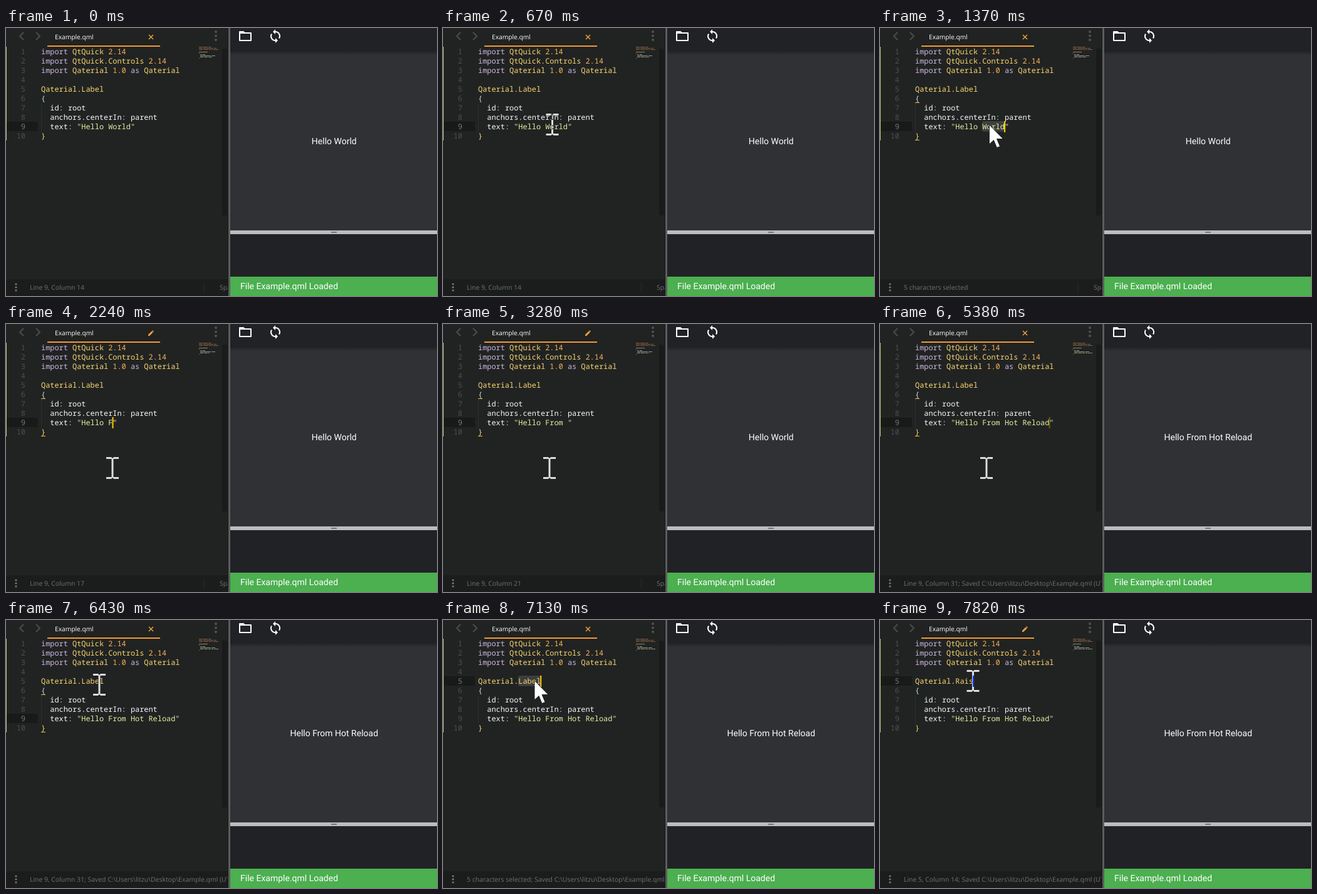
These frames come from a looping animation (688 by 429 pixels, 7.99 s). An HTML page:

```html
<!DOCTYPE html>
<html lang="en">
<head>
<meta charset="utf-8">
<title>Hot reload</title>
<style>
  html, body { margin: 0; width: 100%; height: 100%; overflow: hidden; background: #202322; }
  svg { display: block; width: 688px; height: 429px; }
  text { white-space: pre; text-rendering: geometricPrecision; }
  .code { font: 11.92px "Noto Sans Mono", monospace; }
  .ui { font: 10.45px "Open Sans", sans-serif; fill: #6f7271; }
  .tab { font-size: 10.2px; fill: #fff; }
  .app { font: 14px Roboto, sans-serif; fill: #fff; }
  .beam { mix-blend-mode: difference; fill: #fff; }
</style>
</head>
<body>
<svg viewBox="0 0 688 429">
  <defs>
    <clipPath id="pane"><path d="M0 0H355V429H0z"/></clipPath>
    <linearGradient id="shade" x2="0" y2="1">
      <stop stop-color="#25262a"/><stop offset="1" stop-color="#303135"/>
    </linearGradient>
  </defs>

  <!-- editor -->
  <path fill="#202322" d="M0 0H358V429H0z"/>
  <path fill="#191b1b" d="M345 33h8v267h-8z"/>
  <path fill="#1b1d1d" d="M0 402H355V429H0z"/>
  <path fill="#b9cf78" d="M0 30h1v150H0z"/>
  <path fill="#f79a32" d="M66 28h180v2H66z"/>
  <path fill="none" stroke="#4a4d4c" stroke-width="2" d="M28 7l-6 6 6 6M48 7l6 6-6 6"/>
  <g fill="#505352"><circle cx="335" cy="6" r="2"/><circle cx="335" cy="12.500" r="2"/><circle cx="335" cy="19" r="2"/></g>
  <g fill="#777a79"><circle cx="16" cy="410" r="1.600"/><circle cx="16" cy="415" r="1.600"/><circle cx="16" cy="420" r="1.600"/></g>
  <text class="ui tab" x="78" y="18">Example.qml</text>
  <path stroke="#383c3b" stroke-dasharray="1 1" d="M56.500 121v45"/>
  <g id="editor" clip-path="url(#pane)"></g>

  <!-- preview -->
  <path fill="#303135" d="M358 38H688V324H358z"/>
  <path fill="#212226" d="M358 0H688V38H358zM358 330H688V398H358z"/>
  <path fill="url(#shade)" d="M358 38H688v6H358z"/>
  <path fill="#bdbdbd" d="M358 324H688v6H358z"/>
  <path fill="#77787a" d="M519 326h9v2h-9z"/>
  <path fill="#4caf50" d="M358 398H688V429H358z"/>
  <path fill="#191b1b" d="M354 0h1V429h-1z"/>
  <path fill="#5c5d5d" d="M355 0h3V429h-3z"/>
  <path fill="none" stroke="#fff" stroke-width="2" stroke-linejoin="round" d="M373 8V6h6l2 2h10v12H373zV8h9"/>
  <g transform="translate(418 1)" fill="#fff">
    <path fill="none" stroke="#fff" stroke-width="2" d="M12 5a7 7 0 0 1 6 10.600M12 19a7 7 0 0 1-6-10.600"/>
    <path d="M12 1L8 5l4 4zM12 15l4 4-4 4z"/>
  </g>
  <text id="label" class="app" x="523.800" y="185.500" text-anchor="middle"></text>
  <text class="app" x="374" y="418">File Example.qml Loaded</text>
  <g id="mouse"></g>
</svg>

<script>
const LOOP = 7990, LEFT = 56, CHAR = 7.15, ROW = 15;
const KEYWORD = '#cdb6e0', TYPE = '#fbd470', NUMBER = '#f9b25c', PLAIN = '#f7f8f7',
      COLON = '#bfdce2', STRING = '#e4eda0', CARET = '#ffcc00', ORANGE = '#f9a43a';
const byId = id => document.getElementById(id);
const columnX = column => LEFT + (column - 1) * CHAR;
const rowTop = line => 15 + ROW * line;
const rect = (x, y, w, h, fill, more = '') =>
  `<rect x="${x}" y="${y}" width="${w}" height="${h}" fill="${fill}" ${more}/>`;

// Each step overrides part of the state and holds until the next one.
const steps = [
  [0, { message: 'World', type: 'Label', label: 'Hello World', line: 9, column: 14,
        caret: 0, braces: false, selection: 0, counted: false, saved: false, dirty: false,
        mouse: null, arrow: false }],
  [140, { mouse: [184, 398] }],
  [310, { mouse: [181, 285] }],
  [500, { mouse: [177, 190] }],
  [670, { mouse: [174.5, 155] }],
  [1010, { column: 17, caret: 1, braces: true }],
  [1180, { column: 21, selection: 5, arrow: true }],
  [1370, { counted: true }],
  [1540, { mouse: [173, 186], arrow: false }],
  [1720, { mouse: [171, 218] }],
  [1890, { mouse: [170, 231] }],
  [2240, { ...typed('F'), selection: 0, counted: false, dirty: true }],
  [2590, typed('From')],
  [2930, typed('From ')],
  [3280, { caret: 0 }],
  [3620, typed('From H')],
  [3790, typed('From Ho')],
  [3970, typed('From Hot')],
  [4140, typed('From Hot ')],
  [4330, typed('From Hot R')],
  [4520, typed('From Hot Re')],
  [4690, typed('From Hot Relo')],
  [4860, typed('From Hot Reloa')],
  [5030, typed('From Hot Reload')],
  [5380, { caret: .35, saved: true, dirty: false, label: 'Hello From Hot Reload' }],
  [5540, { caret: 0 }],
  [6070, { mouse: [167, 208] }],
  [6240, { mouse: [158, 152] }],
  [6420, { mouse: [149, 104] }],
  [6590, { mouse: [148, 98], line: 5, column: 14, caret: 1, braces: false }],
  [6770, { mouse: [146, 97], column: 15, selection: 5, arrow: true }],
  [7130, { counted: true }],
  [7300, { ...typedType('R'), selection: 0, counted: false, dirty: true, mouse: [148.5, 98], arrow: false }],
  [7480, typedType('Ra')],
  [7650, typedType('Rai')],
  [7820, typedType('Rais')]
];

function typed(message) { return { message, column: 16 + message.length, caret: 1 }; }
function typedType(type) { return { type, column: 10 + type.length, caret: 1 }; }

function sourceLines({ message, type }) {
  const use = (name, version) => [[KEYWORD, 'import '], [TYPE, name + ' '], [NUMBER, version]];
  const property = (name, value, color = PLAIN) => [[PLAIN, '  ' + name], [COLON, ': '], [color, value]];
  return [
    use('QtQuick', '2.14'),
    use('QtQuick.Controls', '2.14'),
    [...use('Qaterial', '1.0'), [KEYWORD, ' as '], [TYPE, 'Qaterial']],
    [],
    [[TYPE, 'Qaterial'], [PLAIN, '.'], [TYPE, type]],
    [[COLON, '{']],
    property('id', 'root'),
    property('anchors.centerIn', 'parent'),
    property('text', `"Hello ${message}"`, STRING),
    [[TYPE, '}']]
  ];
}

function codeRow(tokens, index, state) {
  const y = 27 + ROW * (index + 1);
  const spans = tokens.map(([color, text]) => `<tspan fill="${color}">${text}</tspan>`).join('');
  const numberColor = index + 1 === state.line ? '#747877' : '#4b4f4e';
  return `<text class="code" x="31" y="${y}" text-anchor="end" fill="${numberColor}">${index + 1}</text>` +
         `<text class="code" x="${LEFT}" y="${y}">${spans}</text>`;
}

function minimapRow(tokens, index) {
  let x = 308, out = '';
  for (const [color, text] of tokens) {
    for (const word of text.matchAll(/\S+/g))
      out += rect(x + word.index, 30 + index * 2, word[0].length, 1,
                  index < 3 ? '#d98a62' : color, 'opacity=".55"');
    x += text.length;
  }
  return out;
}

function statusText({ line, column, counted, saved }) {
  const place = counted ? '5 characters selected' : `Line ${line}, Column ${column}`;
  return place + (saved ? '; Saved C:\\Users\\litzu\\Desktop\\Example.qml (UTF-8)' : '');
}

function tabIcon(dirty) {
  return dirty
    ? `<path fill="${ORANGE}" transform="translate(225.5 8.5) scale(.5)"
        d="M3 17V21h4L18 10l-4-4zM21 7L17 3l-2 2 4 4z"/>`
    : `<path stroke="${ORANGE}" stroke-width="1.400" d="M228 11l7 7M235 11l-7 7"/>`;
}

function editor(state) {
  const { line, column, selection, caret, braces, saved, dirty } = state;
  const lines = sourceLines(state);
  const top = rowTop(line);
  let out = rect(1, top, 50, ROW, '#181a1a');
  if (selection)
    out += rect(columnX(column - selection), top, selection * CHAR, ROW, '#3b3e3d', 'rx="2" stroke="#4a4d4c"');
  out += lines.map((tokens, i) => codeRow(tokens, i, state)).join('');
  out += lines.map(minimapRow).join('');
  if (braces) out += [6, 10].map(n => rect(LEFT, rowTop(n) + 14, 7, 1, '#f0b83c')).join('');
  out += rect(columnX(column) - .9, top - 1, 2, 18, CARET, `opacity="${caret}"`);
  out += `<text class="ui" x="38" y="419">${statusText(state)}</text>`;
  if (!saved) out += rect(316, 407, 1, 17, '#282b2a') + '<text class="ui" x="341" y="419">Spaces: 2</text>';
  return out + tabIcon(dirty);
}

function pointer({ mouse, arrow }) {
  if (!mouse) return '';
  const shape = arrow
    ? '<path fill="#fff" stroke="#111" stroke-width=".8" d="M0 0V31L7 24.500 12 36.500 17 34.500 12 22.500H22z"/>'
    : '<path d="M-10-18h8l2 2 2-2h8v3H1.500V14H10v3H2l-2-2-2 2h-8v-3h8.500V-15H-10z"/>';
  return `<g transform="translate(${mouse})">${shape}</g>`;
}

let shown = -1;
function draw(now) {
  const time = now % LOOP;
  const current = steps.findLastIndex(([start]) => start <= time);
  if (current !== shown) {
    shown = current;
    const state = Object.assign({}, ...steps.slice(0, current + 1).map(step => step[1]));
    byId('editor').innerHTML = editor(state);
    byId('label').textContent = state.label;
    byId('mouse').setAttribute('class', state.arrow ? '' : 'beam');
    byId('mouse').innerHTML = pointer(state);
  }
  requestAnimationFrame(() => draw(performance.now() - origin));
}
const origin = performance.now();
draw(0);
</script>
</body>
</html>
```
